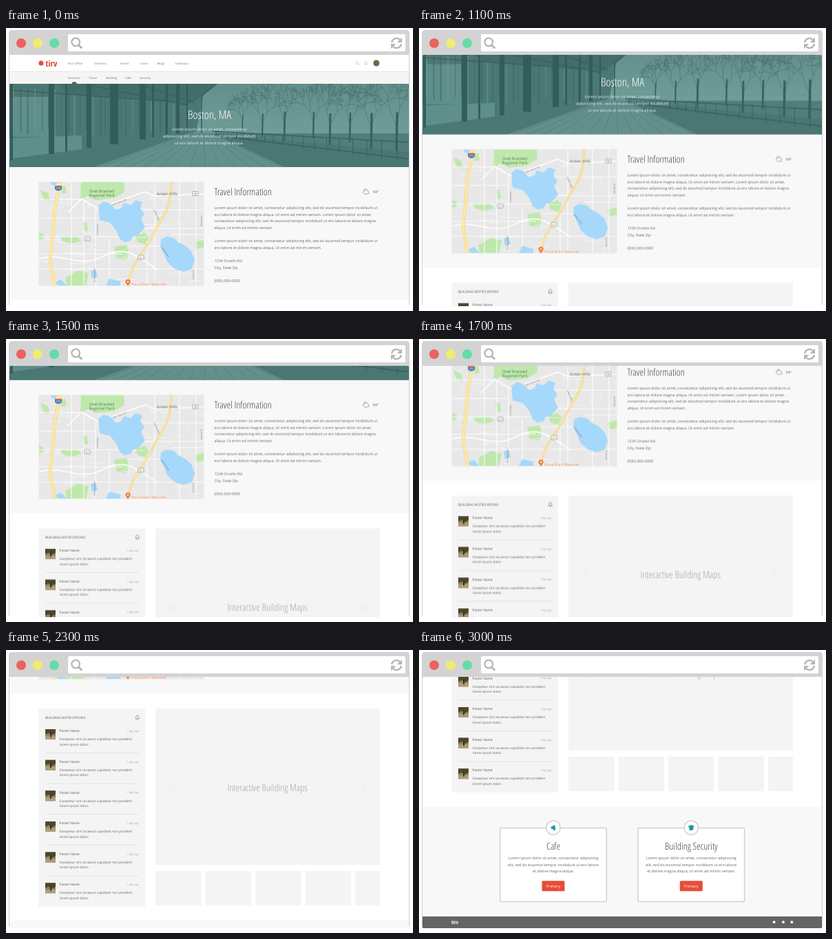
An HTML page for the animation above (5000 ms loop, 591 px wide and 411 px high).

```html
<!DOCTYPE html>
<html lang="en">
<head>
<meta charset="utf-8">
<title>Scrolling office page</title>
<style>
html, body { margin: 0; width: 100%; height: 100%; overflow: hidden; background: #fff; }
svg { display: block; width: 591px; height: 411px; }
text { font-family: "Open Sans", "Noto Sans", sans-serif; text-rendering: geometricPrecision; }
.cond { font-family: "Open Sans Condensed Light", "Open Sans", sans-serif; font-stretch: 75%; font-weight: 300; }
.logo { font-family: "Open Sans Condensed", "Open Sans", sans-serif; font-stretch: 75%; font-weight: 700; }
#page { animation: scroll 5s infinite; }
@keyframes scroll {
  0% { transform: translateY(0); }
  20% { transform: translateY(0); animation-timing-function: steps(21, start); }
  62%, 100% { transform: translateY(-498px); }
}
</style>
</head>
<body>
<svg id="stage" viewBox="0 0 591 411"></svg>
<script>
const rect = (x, y, w, h, fill, extra = '') =>
  `<rect x="${x}" y="${y}" width="${w}" height="${h}" fill="${fill}" ${extra}/>`;
const circle = (x, y, r, fill, extra = '') =>
  `<circle cx="${x}" cy="${y}" r="${r}" fill="${fill}" ${extra}/>`;
const shape = (d, fill, extra = '') => `<path d="${d}" fill="${fill}" ${extra}/>`;
const line = (d, stroke, width = 1, extra = '') =>
  `<path d="${d}" fill="none" stroke="${stroke}" stroke-width="${width}" ${extra}/>`;
const text = (x, y, size, fill, str, extra = '') =>
  `<text x="${x}" y="${y}" font-size="${size}" fill="${fill}" ${extra}>${str}</text>`;
const MID = 'text-anchor="middle"';
const times = (n, fn) => Array.from({ length: n }, (_, i) => fn(i)).join('');
const lines = (x, y, step, size, fill, rows, extra) =>
  rows.map((row, i) => text(x, y + i * step, size, fill, row, extra)).join('');

let seed = 7;
const random = () => (seed = (seed * 16807) % 2147483647) / 2147483647;

const bell = (x, y, s, color = '#777') => line(
  'M-3 2C-2 1-2 0-2-1C-2-4 2-4 2-1C2 0 2 1 3 2ZM-1 3Q0 4 1 3', color, .8,
  `transform="translate(${x} ${y}) scale(${s})"`);

function nav() {
  const top = [['Your Office', 89.5], ['Directory', 128], ['Events', 165.5],
    ['Learn', 195], ['Blogs', 219.5], ['Company', 246]];
  const sub = [['Overview', 89.5], ['Travel', 120], ['Building', 145],
    ['Cafe', 173], ['Security', 194]];
  const items = (list, y) => list.map(([s, x]) => text(x, y, 4.25, '#777', s)).join('');
  return rect(5, 39, 580, 25, '#fff') + rect(5, 63.5, 580, 18, '#f5f5f5') +
    line('M5 63.5H96L99.5 60.5L103 63.5H585', '#dedede', .8) +
    shape('M96.3 64L99.5 61L102.7 64Z', '#f5f5f5') +
    circle(51, 51, 3.5, '#e8483c') +
    text(57.5, 55.5, 12.5, '#e0463c', 'tirv', 'class="logo"') +
    items(top, 52.8) + items(sub, 74.2) +
    circle(509.8, 50.8, 1.9, 'none', 'stroke="#b5b5b5" stroke-width=".6"') +
    line('M511.2 52.2L513 54', '#b5b5b5', .6) + bell(522.5, 51, .75, '#b5b5b5') +
    circle(537.8, 51, 4.5, '#71644c') + circle(99.2, 82, 3.8, '#41615f');
}

function branch(x, y, length, angle, depth) {
  const x2 = x + Math.cos(angle) * length, y2 = y + Math.sin(angle) * length;
  const step = `M${x.toFixed(1)} ${y.toFixed(1)}L${x2.toFixed(1)} ${y2.toFixed(1)}`;
  if (!depth) return step;
  return step + [-1, 1].map(side => branch(x2, y2, length * (.62 + random() * .2),
    angle + side * (.15 + random() * .4), depth - 1)).join('');
}

function hero() {
  const trees = [[343, 150, 15], [372, 158, 21], [404, 166, 28], [446, 160, 24],
    [470, 172, 30], [499, 166, 27], [530, 178, 34], [567, 180, 36]];
  const columns = [[6, 4], [62, 8], [86, 3], [117, 7], [151, 12], [194, 9], [212, 3], [232, 3], [247, 5], [262, 2]];
  const scene = rect(5, 81, 580, 121, 'url(#sky)') +
    rect(300, 146, 285, 8, '#76a09d') + rect(260, 153, 325, 49, '#507a78') +
    shape('M5 81H290L276 150L130 202H5Z', '#487371') +
    rect(8, 100, 54, 58, '#638f8c') + shape('M5 160L110 156V176L5 190Z', '#62908c') +
    times(26, i => rect(10 + i * 9.5 + random() * 5, 88, .8 + random() * 1.5,
      55 + random() * 15, i % 3 ? '#345b59' : '#709b97', 'opacity=".6"')) +
    shape('M75 81H306L286 98L262 112L240 106L90 96Z', '#3c6563') +
    line('M5 90L240 107M110 81L262 112M190 81L274 108', '#2f5553', 1.4) +
    columns.map(([x, w]) => rect(x, 81, w, 112 - x * .16, '#2c514f')).join('') +
    line('M306 81L284 98V152', '#2f5553', 1.6) +
    shape('M268 152H302L406 202H128Z', '#67918d') +
    times(13, i => line(`M${270 + i * 2.4} 153L${135 + i * 22} 202`, '#4e7674', .7)) +
    trees.map(([x, y, n]) => line(branch(x, y, n, -Math.PI / 2, 6), '#42696a', .6) +
      line(`M${x} ${y}L${x + 1} ${y - n * 1.6}`, '#315756', n / 10)).join('') +
    shape('M302 154L585 180V202H404Z', '#456e6c', 'opacity=".8"') +
    line('M300 150L585 166M302 156L585 190', '#2f5453', 1.3) +
    times(24, i => {
      const x = 304 + i * i * .5 + i;
      return line(`M${x} ${150 + (x - 302) * .056}V${156 + (x - 302) * .14}`, '#2f5453', .9);
    });
  return `<g clip-path="url(#heroBox)">${scene}${rect(5, 81, 580, 121, '#568c89', 'opacity=".2"')}</g>` +
    text(295.5, 131.5, 17, '#fff', 'Boston, MA', `class="cond" ${MID}`) +
    lines(295.2, 149, 9.8, 5.8, '#e4eeed', ['Lorem ipsum dolor sit amet, consectetur',
      'adipisicing elit, sed do eiusmod tempor incididunt',
      'ut ero labore et dolore magna aliqua.'], MID);
}

function map() {
  const water = ['M134 258L142 252L151 255L160 264L168 261L171 254L181 257L188 250L198 253L195 262L201 270L196 277L202 289L193 300L184 303L181 309L172 311L165 306L160 294L151 283L136 279Z',
    'M225 307L233 303L244 305L250 311L260 316L269 324L274 337L270 350L258 354L245 350L234 340L229 327L224 318Z',
    'M72 369L80 365L88 374H75Z', 'M123 353L130 351L133 361L125 364Z',
    'M150 364L166 368V374H145Z', 'M65 224H75L72 229L66 228Z', 'M153 265L157 273L153 276Z'];
  const parks = ['M109 224H171L172 238L157 247L130 250L119 244L108 250Z', 'M50 235L61 240L64 251L55 249Z',
    'M79 230L86 229L88 239L81 241Z', 'M79 304L104 303L109 309L96 313L82 310Z',
    'M157 318L175 315L179 329L174 337L160 334Z', 'M188 302L201 297L207 304L203 314L191 311Z',
    'M86 363L104 352L120 356L116 374H88Z', 'M274 311L287 308V319L276 321Z', 'M48 297L55 300L54 306L48 308Z',
    'M111 283L117 282L119 295L113 295Z'];
  const freeway = 'M79 223C74 247 70 258 69 284S63 320 65 344L71 375';
  const highway = 'M240 223C238 248 238 260 227 276S216 298 205 315S187 340 181 356L177 375';
  const minor = times(46, () => {
    const x = 50 + random() * 235, y = 226 + random() * 145;
    return `M${x} ${y}h${8 + random() * 25}M${x + 5} ${y}v${random() * 24 - 12}`;
  });
  const label = (x, y, str, angle = -90) => text(0, 0, 3.4, '#777', str,
    `transform="translate(${x} ${y}) rotate(${angle})"`);
  const shield = (x, y, str) => rect(x - 4, y - 3, 8, 6, '#fff', 'rx="1" stroke="#777" stroke-width=".6"') +
    text(x, y + 1.5, 4, '#555', str, MID);
  return `<g clip-path="url(#mapBox)">` + rect(47, 223, 241, 152, '#e8e8e8') +
    shape(parks.join(''), '#bfe8ac') +
    line(minor, '#f8f8f8', .7) +
    line('M48 249H112M48 276H130M48 303H163M48 328H170M48 350H287M95 224V374M113 250V374M130 262V374M150 306V374M205 310V374M216 224V374M252 224V374M276 224V374M200 264H287M195 291H287M178 317H230M240 300H287', '#fff', 1.1) +
    line('M90 268L110 248L133 262L168 250L201 238L216 244L287 241M48 335C85 325 105 350 140 332S191 332 220 351', '#fff', 1.7) +
    shape(water.join(''), '#a6d8fb') +
    line(freeway, '#ead28d', 4.6) + line(freeway, '#ffe9a0', 3.5) +
    line(highway, '#e7cf8c', 3.2) + line(highway, '#ffe49b', 2.3) +
    label(134, 301, 'Torvel Ave') + label(130, 370, 'Fennow Rd N') + label(285, 288, 'Marlek St') +
    label(214, 264, 'Orden Hwy', 65) + label(225, 319, 'Velmer Ave', 53) +
    label(273, 365, 'Corvin St') + label(154, 258, 'Lake Tolver Rd', -20) +
    shape('M71 230H81V234Q76 239 71 234Z', '#4c77b9') + rect(71, 229, 10, 2, '#cc625c') +
    text(76, 234, 3.6, '#fff', '694', MID) +
    shield(118, 306, '51') + shield(196, 333, '51') + shield(275, 240.5, '96') +
    lines(139, 239, 6.3, 5.8, '#47804a', ['Odel Brantwil', 'Regional Park'], MID) +
    text(234, 242.5, 6, '#666', 'Arden Hills', MID) +
    shape('M177 375C176 372 173.5 371 173.5 368.5A3.5 3.5 0 0 1 180.5 368.5C180.5 371 178 372 177 375Z', '#ed7836') +
    circle(177, 368.5, 1.2, '#fff') +
    text(182, 373.8, 5.6, '#e0733b', 'Pizza Dorn Wexville', 'stroke="#fff" stroke-width=".8" paint-order="stroke"') +
    '</g>';
}

const LOREM = 'Lorem ipsum dolor sit amet, consectetur adipisicing elit, sed do eiusmod tempor incididunt ut';
const VENIAM = 'magna aliqua. Ut enim ad minim veniam.';

function travel() {
  const copy = (y, rows) => lines(302.5, y, 9.7, 5.45, '#666', rows);
  return rect(5, 202, 580, 193.7, '#f8f8f8') + map() +
    text(302.5, 242.8, 14.3, '#444', 'Travel Information', 'class="cond"') +
    line('M-3 3.5A2 2 0 0 1-2-.3A3 3 0 0 1 3.5.5A1.8 1.8 0 0 1 3 4H-2.500M-3-1A2.600 2.600 0 0 1 1-3', '#888', .8,
      'transform="translate(522.5 237)"') +
    text(532.5, 239.5, 5.6, '#666', '94°') +
    copy(262.8, [LOREM, `ero labore et dolore ${VENIAM} Lorem ipsum dolor sit amet,`,
      'consectetur adipisicing elit, sed do eiusmod tempor incididunt ut ero labore et dolore magna',
      'aliqua. Ut enim ad minim veniam.']) +
    copy(311, [LOREM, `ero labore et dolore ${VENIAM}`]) +
    copy(340, ['1234 Orvelin Rd', 'City, State Zip']) + copy(369, ['(000) 000-0000']);
}

function post(i) {
  const y = 449.5 + i * 44.65;
  return rect(57, y - 2.5, 15, 15, '#8c8064') + rect(57, y + 7, 15, 5.5, '#b09c7b') +
    shape(`M57 ${y - 2.5}H72V${y + 3}L67 ${y + 6}L62 ${y + 3}L57 ${y + 5}Z`, '#4c472b') +
    rect(64, y + 2, 2, 7, '#3f3220') +
    text(77.5, y + 1.7, 4.8, '#555', 'Poster Name') +
    text(193, y + 1.5, 4, '#aaa', '1 day ago', 'text-anchor="end"') +
    lines(78, y + 13.7, 7.4, 4.8, '#666', ['Excepteur sint occaecat cupidatat non proident', 'lorem ipsum dolor.']) +
    (i < 5 ? rect(57, y + 31.5, 136, .8, '#dfdfdf') : '');
}

function building() {
  const chevron = d => line(d, '#d2d2d2', 3) + line(d, '#fff', 1.9);
  return rect(5, 395.7, 580, 329.3, '#fff') + rect(47.5, 417.5, 154.5, 287.3, '#f4f4f4') +
    text(57, 432.2, 4.8, '#555', 'BUILDING NOTIFICATIONS') + bell(190.7, 430, .95) + times(6, post) +
    rect(217, 417.5, 326, 226.5, '#f4f4f4') +
    text(379.8, 537, 14.3, '#a5a5a5', 'Interactive Building Maps', `class="cond" ${MID}`) +
    chevron('M245 525.5L238.5 532L245 538.5') + chevron('M514.5 525.5L521 532L514.5 538.5') +
    times(5, i => rect(217 + i * 72.5, 653, i < 4 ? 66.5 : 36, 50, '#f4f4f4'));
}

function card(x, title, ending, icon) {
  return rect(x - 77.3, 756.5, 154.6, 107, '#fff', 'rx="2" stroke="#d0d0d0" stroke-width="1.5"') +
    circle(x, 756, 10.2, '#fff', 'stroke="#cbcbcb" stroke-width="1.2"') +
    shape(icon, '#1a9aa6', `transform="translate(${x} 756)"`) +
    text(x, 788, 14.3, '#444', title, `class="cond" ${MID}`) +
    lines(x, 802, 9.7, 5.45, '#666', ['Lorem ipsum dolor sit amet, consectetur adipisicing',
      'elit, sed do eiusmod tempor incididunt ut ero labore', ending], MID) +
    rect(x - 16.5, 833.3, 33, 15, '#e84c38', 'rx="1.5"') +
    text(x, 843, 5.6, '#fff', 'Primary', MID);
}

function footer() {
  return rect(5, 725, 580, 160, '#f8f8f8') +
    card(195, 'Cafe', 'et dolore magna aliqua.', 'M-4.5 0L1.5-4Q4 0 2.5 4.5Z') +
    card(395.3, 'Building Security', `et dolore ${VENIAM}`,
      'M-4.5-2L0-4L4.5-2L3 0V3Q0 5 -3 3V0Z') +
    rect(5, 885, 580, 18.5, '#646464') +
    text(47, 896, 7.6, '#fff', 'tirv', 'class="logo"') +
    [515.6, 529, 541.3].map(x => circle(x, 893.2, 1.9, '#fff')).join('');
}

function browser() {
  const half = line('M560.2 21A6.8 6.8 0 0 1 572 17.2', '#b5b5b5', 2.4) +
    shape('M575 13.8V21H567.8Z', '#b5b5b5');
  return shape('M4 39V8Q4 3 9 3H581Q586 3 586 8V39Z', '#d3d3d3') +
    line('M4.5 38V402M585.5 38V402', '#cfcfcf') +
    ['#eb625e', '#f0ec70', '#63dca8'].map((c, i) => circle(22 + i * 24, 22, 7, c)).join('') +
    rect(90, 9, 490, 25, '#fff', 'rx="2"') +
    circle(101.2, 20.5, 5.8, 'none', 'stroke="#b5b5b5" stroke-width="2.2"') +
    line('M105.4 24.7L110.3 29.6', '#b5b5b5', 2.8) +
    half + `<g transform="rotate(180 567 22)">${half}</g>`;
}

document.getElementById('stage').innerHTML = `<defs>
  <clipPath id="view">${rect(5, 39, 580, 365, '#000', 'rx="1.5"')}</clipPath>
  <clipPath id="heroBox">${rect(5, 81, 580, 121, '#000')}</clipPath>
  <clipPath id="mapBox">${rect(47.5, 223.5, 240, 151, '#000')}</clipPath>
  <linearGradient id="sky" x2="0" y2="1">
    <stop stop-color="#658f8c"/><stop offset=".5" stop-color="#759e9a"/><stop offset="1" stop-color="#507a78"/>
  </linearGradient></defs>
  <g clip-path="url(#view)"><g id="page">${nav() + hero() + travel() + building() + footer()}</g></g>` + browser();
</script>
</body>
</html>
```
